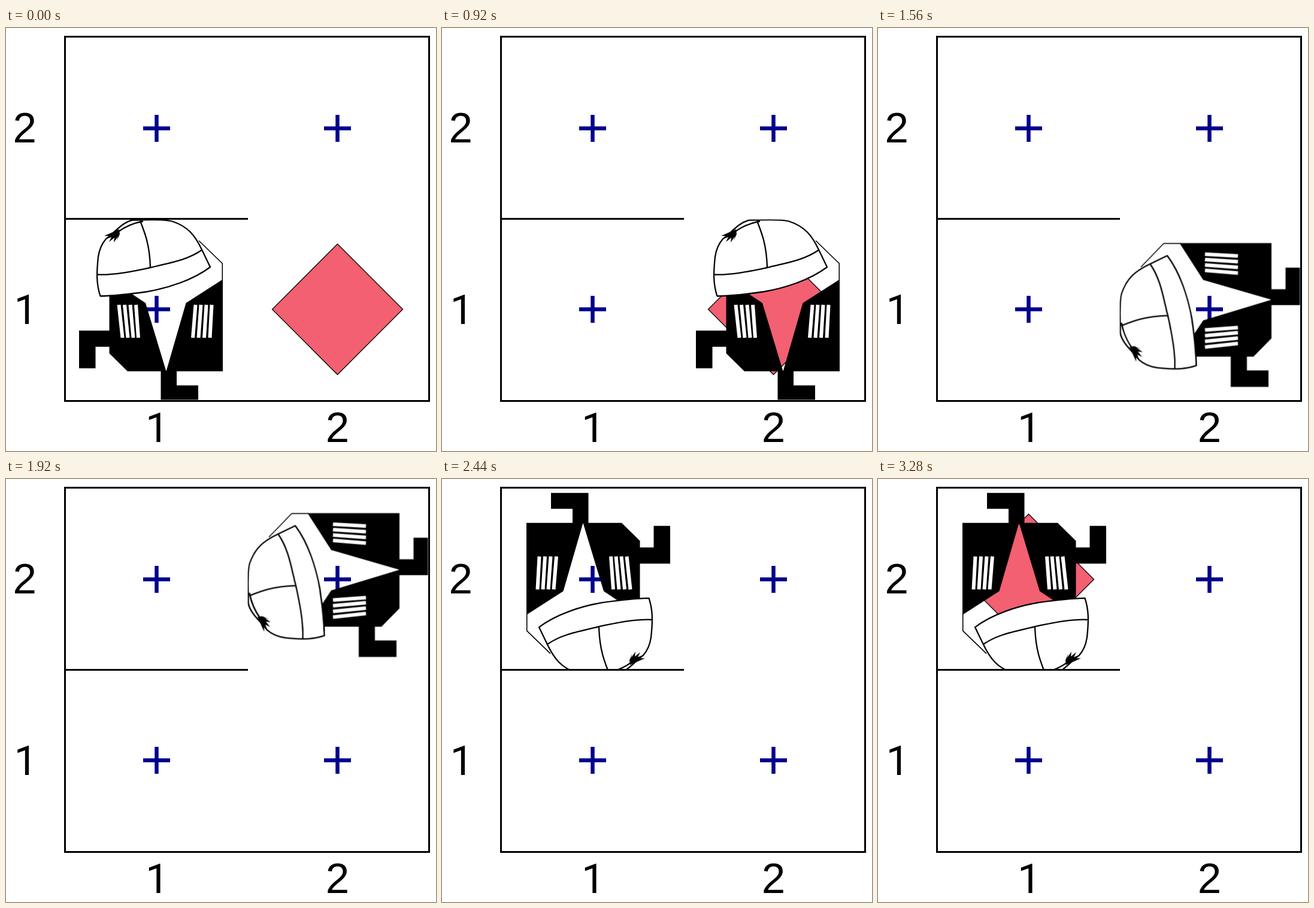
Animation, 718 px wide and 706 px high, one loop 3360 ms. Source, as an HTML page:

```html
<!DOCTYPE html>
<html lang="en">
<head>
<meta charset="utf-8">
<title>Robot in a grid world</title>
<style>
  html, body { margin: 0; width: 100%; height: 100%; overflow: hidden; background: #fff; }
  svg { display: block; width: 718px; height: 706px; }
  text { font: 71px "Liberation Sans", Arial, sans-serif; text-anchor: middle; }
  .one { font: 69px Roboto, sans-serif; }
  .line { fill: none; stroke: #000; stroke-width: 2.3; stroke-linejoin: round; }
  #pose { filter: blur(.6px); }
</style>
</head>
<body>
<svg viewBox="0 0 718 706">
  <defs>
    <clipPath id="cell"><rect x="-150" y="-150" width="301" height="301"/></clipPath>
    <path id="plus" d="M-22.5 0H22.5M0-22.5V22.5" stroke="#00008b" stroke-width="6.500"/>
  </defs>

  <use href="#plus" x="251.500" y="167.500"/>
  <use href="#plus" x="553.500" y="167.500"/>
  <use href="#plus" x="251.500" y="469.500"/>
  <use href="#plus" x="553.500" y="469.500"/>

  <path id="beeper" d="M0-109L109 0L0 109L-109 0Z" fill="#f26072" stroke="#000" stroke-width="1.300"/>

  <g id="robot">
    <g clip-path="url(#cell)">
      <g id="pose">
        <g transform="translate(-251.500 -469.500)">
          <!-- jacket, arm, leg -->
          <path d="M172.500 446L209 443L233 459L267.500 573L300.500 459L362 419.500V573H203L172.500 543Z"/>
          <path d="M122 505H174V532H149.500V568H122Z"/>
          <path d="M258.500 572H285V596.500H321V623H258.500Z"/>
          <path d="M188.500 462L194.500 517M198 462L203.500 517M207.500 462L212.500 517M217 462L221 517
                   M316.500 462L312 517M325.500 462L321.500 517M334.500 462L331 517M343.500 462L340.500 517"
                stroke="#fff" stroke-width="6"/>
          <path class="line" style="stroke-width:1.6" d="M322 355L361.300 393V421"/>
          <!-- hat -->
          <path class="line" style="fill:#fff" d="M157.500 447.500C151 428 151 410 154 382C156 368 160 360 167 352
            C182 341 194 324 212 320.500H226C240 320 262 319 277 322.500C304 331 316 347 327 370L341 399
            C312 421 270 434 236 440C208 444 184 447 157.500 447.500Z"/>
          <path class="line" d="M152 411.500C180 413 212 406 241 400C272 392 302 388 327 370.500
            M224 322C232 342 240 362 241 400M186 341C198 332 210 326 229 322.500"/>
          <path d="M189 336L164 347L173 347L165 353L176 349L172 357L181 350L180 358L187 348L185 355L190 344Z"/>
        </g>
      </g>
    </g>
  </g>

  <path d="M98.500 14.500H706.500V622.500H98.500ZM98.500 318.500H404" fill="none" stroke="#000" stroke-width="3"/>

  <text x="31.300" y="191.300">2</text>
  <text class="one" x="33" y="494">1</text>
  <text class="one" x="252.500" y="691.300">1</text>
  <text x="553.500" y="691.300">2</text>
</svg>
<script>
const EAST = "", NORTH = "rotate(-90)", WEST = "translate(0 9.3) rotate(180)";
// start time, robot cell, heading, beeper cell
const steps = [
  [0,    [1, 1], EAST,  [2, 1]],
  [640,  [2, 1], EAST,  [2, 1]],
  [1000, [2, 1], EAST,  null],
  [1360, [2, 1], NORTH, null],
  [1720, [2, 2], NORTH, null],
  [2080, [2, 2], WEST,  null],
  [2440, [1, 2], WEST,  null],
  [2840, [1, 2], WEST,  [1, 2]]
];
const byId = id => document.getElementById(id);
const robot = byId("robot"), pose = byId("pose"), beeper = byId("beeper");

function place(el, cell) {
  el.style.display = cell ? "" : "none";
  if (cell) el.setAttribute("transform", `translate(${302 * cell[0] - 50.5} ${771.5 - 302 * cell[1]})`);
}

function draw() {
  const t = performance.now() % 3360;
  const [, at, heading, beeperAt] = steps.findLast(s => s[0] <= t);
  place(robot, at);
  place(beeper, beeperAt);
  pose.setAttribute("transform", heading);
  requestAnimationFrame(draw);
}
draw();
</script>
</body>
</html>
```
